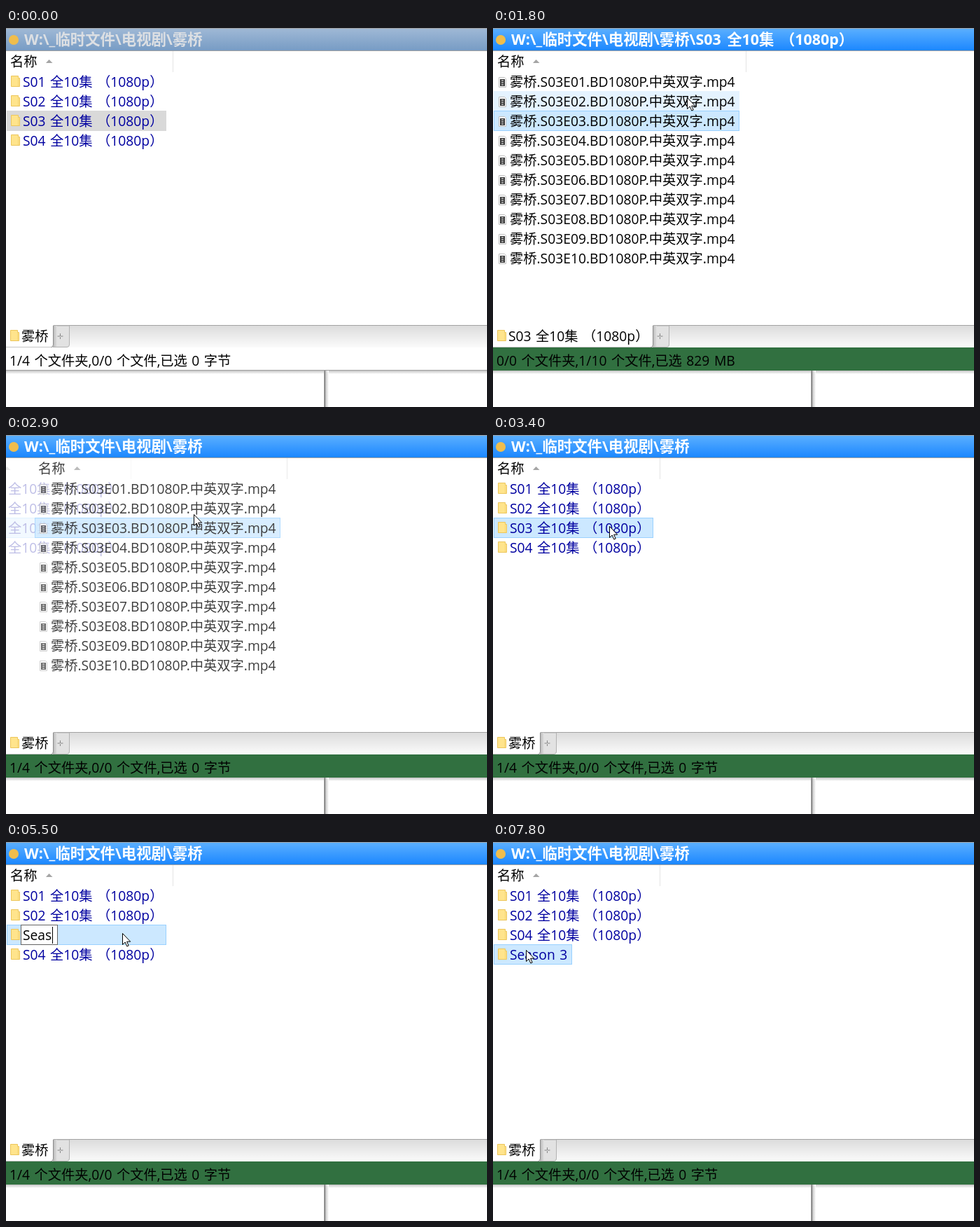
Write an HTML page that moves like this. It is 687 by 541 pixels and loops after 8 s.

```html
<!DOCTYPE html>
<html lang="zh-CN">
<head>
<meta charset="utf-8">
<title>Folder rename</title>
<style>
html, body { margin: 0; width: 100%; height: 100%; overflow: hidden; background: #fff; }
svg { display: block; width: 687px; height: 541px; }
text { font: 19.25px "Open Sans", "Noto Sans CJK SC", "Noto Sans CJK", sans-serif; word-spacing: 1.5px; white-space: pre; }
.title { font-size: 21.4px; font-weight: bold; word-spacing: 3px; }
rect { shape-rendering: crispEdges; }
</style>
</head>
<body>
<svg viewBox="0 0 687 541">
  <defs>
    <linearGradient id="on" x2="0" y2="1"><stop stop-color="#5cb0ff"/><stop offset="1" stop-color="#1a86ff"/></linearGradient>
    <linearGradient id="off" x2="0" y2="1"><stop stop-color="#a0b9d6"/><stop offset="1" stop-color="#769bc4"/></linearGradient>
    <linearGradient id="bar" x2="0" y2="1"><stop stop-color="#dcdcdc"/><stop offset="1" stop-color="#fbfbfb"/></linearGradient>
    <linearGradient id="down" x2="0" y2="1"><stop stop-color="#c4c4c4"/><stop offset="1" stop-color="#fff"/></linearGradient>
    <linearGradient id="side"><stop stop-color="#c0c0c0"/><stop offset="1" stop-color="#fff"/></linearGradient>
    <linearGradient id="fold"><stop stop-color="#b4b4b4"/><stop offset="1" stop-color="#e2e2e2"/></linearGradient>
    <clipPath id="pane"><rect y="33" width="687" height="391"/></clipPath>
  </defs>
  <g id="stage"></g>
</svg>
<script>
const LOOP = 8000, TICK = 100;
const SHOW = '雾桥';
const FOLDERS = [1, 2, 3, 4].map(n => `S0${n} 全10集 （1080p）`);
const FILES = Array.from({ length: 10 }, (_, i) =>
  `${SHOW}.S03E${String(i + 1).padStart(2, '0')}.BD1080P.中英双字.mp4`);
const NEW_NAME = 'Season 3';
const TYPED_AT = [4500, 5000, 5200, 5500, 5800, 6000, 6300, 6500];

// time, x, y of the pointer
const PATH = [
  [100, 640, 485], [300, 575, 56], [400, 398, 101], [500, 362, 105], [600, 225, 128],
  [700, 186, 137], [1600, 186, 137], [1800, 277, 99], [2000, 225, 253], [2200, 296, 102],
  [2500, 262, 113], [2600, 268, 113], [2900, 268, 113], [3100, 255, 135], [3400, 166, 130],
  [7400, 166, 130], [7800, 47, 154]
];

const stage = document.getElementById('stage');
const pen = document.createElement('canvas').getContext('2d');

const isActive = t => t >= 800;
const isEditing = t => t >= 3800 && t < 6700;

const rect = (x, y, w, h, fill, more = '') =>
  `<rect x="${x}" y="${y}" width="${w}" height="${h}" fill="${fill}" ${more}/>`;
const label = (x, y, s, fill = '#000', cls = '') =>
  `<text x="${x}" y="${y}" fill="${fill}" class="${cls}">${s}</text>`;
const shape = (d, fill, stroke = 'none') => `<path d="${d}" fill="${fill}" stroke="${stroke}"/>`;

function textWidth(s) {
  pen.font = '19.25px "Open Sans", "Noto Sans CJK SC", "Noto Sans CJK", sans-serif';
  return pen.measureText(s).width + 1.5 * (s.split(' ').length - 1);
}

function pointer(t) {
  if (t < PATH[0][0]) return null;
  const i = PATH.findIndex(p => p[0] > t);
  if (i < 0) return PATH.at(-1).slice(1);
  const [t0, x0, y0] = PATH[i - 1], [t1, x1, y1] = PATH[i];
  const k = (t - t0) / (t1 - t0);
  return [x0 + (x1 - x0) * k, y0 + (y1 - y0) * k];
}

const folderIcon = (x, y) =>
  shape(`M${x + .5} ${y + .5}h10v3h2v12h-12z`, '#ffe48c', '#ecc65c') +
  shape(`M${x + 10.5} ${y + 4}v11`, 'none', '#f5d574');

const fileIcon = (x, y) =>
  shape(`M${x + .5} ${y + .5}h8l2 2v12h-10z`, '#fff', '#c0c0c0') +
  rect(x + 2, y + 3, 7, 10, '#3a3a3a') +
  [4, 7, 10].map(d => rect(x + 4, y + d, 3, 2, '#a0a0a0')).join('');

function list(names, isFiles, selected, active, at) {
  const edge = isFiles ? 361 : 238;
  let out = label(6, 55, '名称') + shape('M57 50l4.500 -5 5 5z', '#a5a5a5') + rect(edge, 33, 1, 30, '#e4e4e4');
  names.forEach((name, i) => {
    const y = 62 + 28 * i;
    const right = isFiles ? 352 : name === NEW_NAME ? 113 : 229;
    const hovered = at && at[0] < right && at[1] >= y && at[1] < y + 28;
    if (i === selected) {
      out += active
        ? rect(1.5, y + .5, right - 2, 28, '#cce8ff', 'stroke="#99d1ff"')
        : rect(1, y, right - 1, 29, '#d9d9d9');
    } else if (hovered) out += rect(1, y, right - 1, 28, '#e5f3ff');
    out += isFiles ? fileIcon(8, y + 8) : folderIcon(7, y + 6);
    out += label(24, y + 22, name, isFiles ? '#000' : '#0000a0');
  });
  return out;
}

const layer = (content, opacity, scale, x, y) =>
  `<g opacity="${opacity}" transform="translate(${x} ${y}) scale(${scale})">${content}</g>`;

function content(t, at) {
  const moved = t >= 6800;
  const names = [...FOLDERS];
  if (isEditing(t)) names[2] = '';
  if (t >= 6700) names[2] = NEW_NAME;
  if (moved) names.splice(2, 2, FOLDERS[3], NEW_NAME);
  const folders = p => list(names, false, moved ? 3 : 2, isActive(t), p);
  const files = p => list(FILES, true, t < 1400 ? -1 : 2, true, p);

  if (t < 1200) return folders(isActive(t) && at);
  if (t < 1300) return layer(files(), .03, .93, 45, 16) + layer(folders(), .75, 1.025, -15.6, -5.7);
  if (t < 1400) return layer(files(), .7, .98, 12, 4.5) + layer(folders(), .3, 1.1, -62, -23);
  if (t < 2900) return files(at);
  if (t < 3000) return layer(folders(), .25, 1, -60, 0) + layer(files(), .75, 1, 40, 0);
  if (t < 3100) return layer(folders(), .7, 1, -15, 0) + layer(files(), .3, 1, 102, 0);
  return folders(at);
}

function editor(t) {
  if (!isEditing(t)) return '';
  const count = TYPED_AT.filter(s => s <= t).length;
  const value = count ? NEW_NAME.slice(0, count) : FOLDERS[2];
  const caret = Math.round(24.5 + textWidth(value));
  let out = rect(21.5, 118.5, caret - 14, 28, '#fff', 'stroke="#646464"');
  if (!count) out += rect(24, 121, caret - 25, 23, '#0078d7');
  out += label(24, 140, value, count ? '#000' : '#fff');
  if (count || t < 4300) out += rect(caret, 121, 1, 24, '#000');
  return out;
}

function tabs(t) {
  const open = t >= 1400 && t < 2900;
  const w = open ? 228 : 67;
  const px = w + 10.5;
  return rect(0, 424, 687, 1, '#a2a2a2') + rect(0, 425, 687, 31, 'url(#bar)') +
    shape(`M${w} 425h23.500v27q0 3.500 -3.500 3.500H${w}z`, '#e2e2e2', '#b2b2b2') +
    rect(w, 425, 6, 30, 'url(#fold)') +
    shape(`M0 424h${w + .5}v28q0 4 -4 4H0z`, '#fff') +
    shape(`M${w + .5} 425v27q0 4 -4 4H0`, 'none', '#8c8c8c') +
    folderIcon(6, 431) + label(22, 447, open ? FOLDERS[2] : SHOW) +
    shape(`M${px} 436v8M${px - 4} 440h8`, 'none', '#868686') +
    rect(px - .5, 439.5, 1, 1, '#f4f4f4');
}

function status(t) {
  const s = t < 1200 || t >= 2900 ? '1/4 个文件夹,0/0 个文件,已选 0 字节'
    : t < 1400 ? '0/0 个文件夹,0/10 个文件,已选 0 字节'
    : '0/0 个文件夹,1/10 个文件,已选 829 MB';
  return rect(0, 456, 687, 33, isActive(t) ? '#317040' : '#fff') + label(5, 482, s);
}

function titleBar(t) {
  const active = isActive(t);
  const path = `W:\\_临时文件\\电视剧\\${SHOW}` + (t >= 1200 && t < 2900 ? '\\' + FOLDERS[2] : '');
  return rect(0, 0, 687, 33, active ? 'url(#on)' : 'url(#off)') +
    rect(0, 0, 687, 1, '#a0a0a0') + rect(0, 32, 687, 1, '#a0a0a0') +
    '<circle cx="11" cy="17" r="7" fill="#f0bd4c"/>' +
    label(26, 24, path, active ? '#fff' : '#dcdfe3', 'title');
}

function scene(t) {
  const at = pointer(t);
  const arrow = at ? `<g transform="translate(${Math.round(at[0])} ${Math.round(at[1])})">` +
    shape('M.5 .5v16l3.700 -3.500 2.600 6 2.400 -1 -2.600 -5.800h5.100z', '#fff', '#000') + '</g>' : '';
  return rect(0, 0, 687, 541, '#fff') +
    `<g clip-path="url(#pane)">${content(t, at)}${editor(t)}</g>` +
    titleBar(t) + tabs(t) + status(t) +
    rect(0, 488, 687, 1, isActive(t) ? '#317040' : '#a0a0a0') + rect(0, 489, 687, 5, 'url(#down)') +
    rect(454, 489, 1, 52, '#a8a8a8') + rect(455, 489, 1, 52, '#777') + rect(456, 489, 5, 52, 'url(#side)') +
    arrow;
}

let shown = -1;
function frame(now) {
  const t = Math.floor(now % LOOP / TICK) * TICK;
  if (t !== shown) stage.innerHTML = scene(shown = t);
  requestAnimationFrame(frame);
}
frame(performance.now());
</script>
</body>
</html>
```
